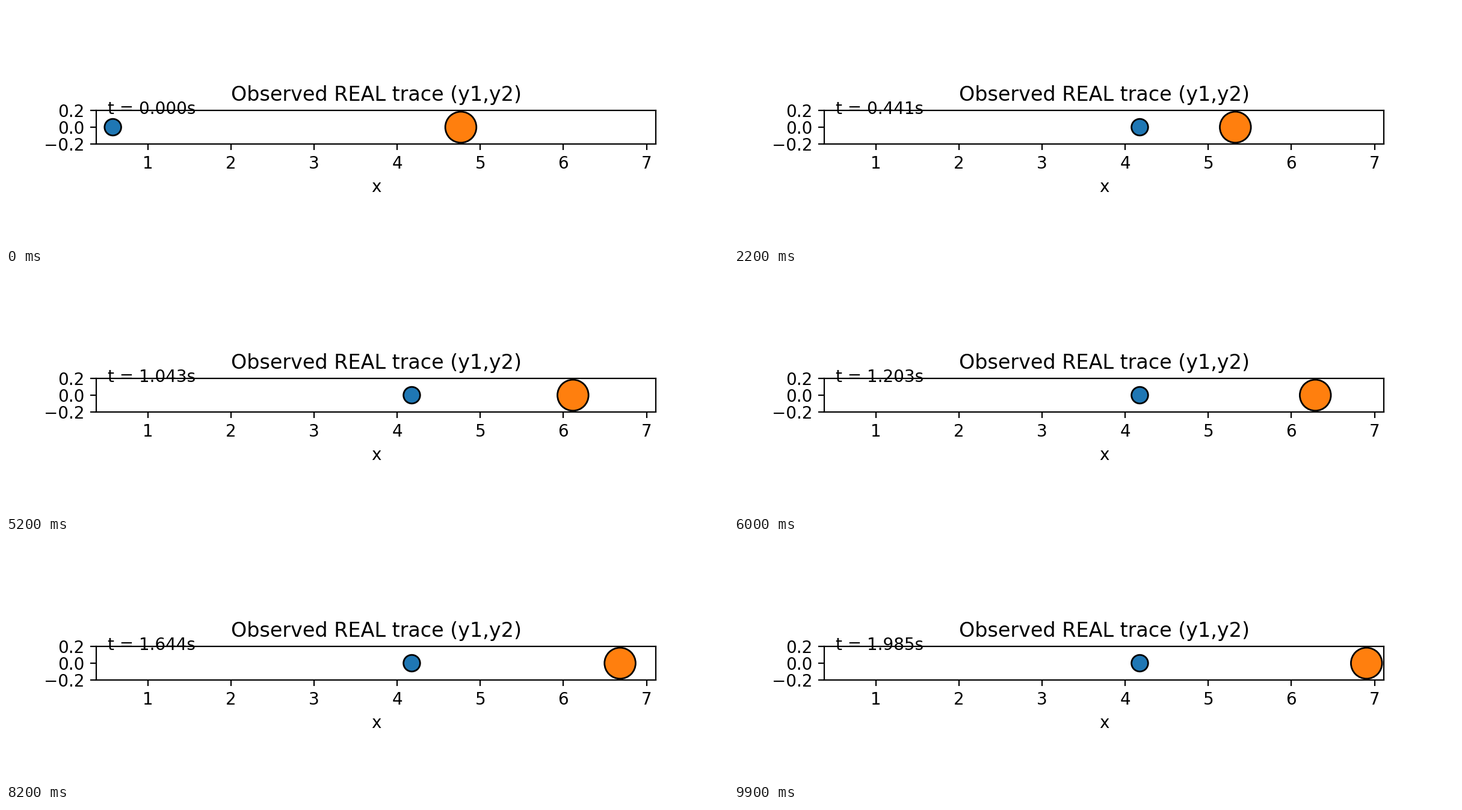
A matplotlib script for the animation above (10000 ms loop, 1200x400 px).

```python
import matplotlib.pyplot as plt
from matplotlib.animation import FuncAnimation
from matplotlib.patches import Circle

FRAMES = 100
STEP = 4 * 2 / 399        # simulated seconds per frame
HIT = 4.6 * STEP          # moment of the push
BLUE_START, BLUE_REST = 0.581, 4.1765
ORANGE_START, SPEED, DRAG = 4.7664, 1.712, 0.616


def blue_x(t):
    """Run in at constant speed, then stop dead."""
    return BLUE_START + (BLUE_REST - BLUE_START) * min(t / HIT, 1)


def orange_x(t):
    """Rest until pushed, then slide with constant friction."""
    s = max(t - HIT, 0)
    return ORANGE_START + SPEED * s - DRAG * s * s / 2


fig, ax = plt.subplots(figsize=(6, 2), dpi=200)
ax.set_xlim(0.381, 7.1115)
ax.set_ylim(-0.2, 0.2)
ax.set_aspect("equal")
ax.set_xlabel("x")
ax.set_title("Observed REAL trace (y1,y2)")

blue = ax.add_patch(Circle((BLUE_START, 0), 0.1, fc="C0", ec="k"))
orange = ax.add_patch(Circle((ORANGE_START, 0), 0.187, fc="C1", ec="k"))
clock = ax.text(0.02, 0.9, "", transform=ax.transAxes)


def draw(i):
    t = i * STEP
    blue.center = (blue_x(t), 0)
    orange.center = (orange_x(t), 0)
    clock.set_text(f"t = {t:.3f}s")
    return blue, orange, clock


anim = FuncAnimation(fig, draw, frames=FRAMES, interval=100, repeat=True)
plt.show()
```
